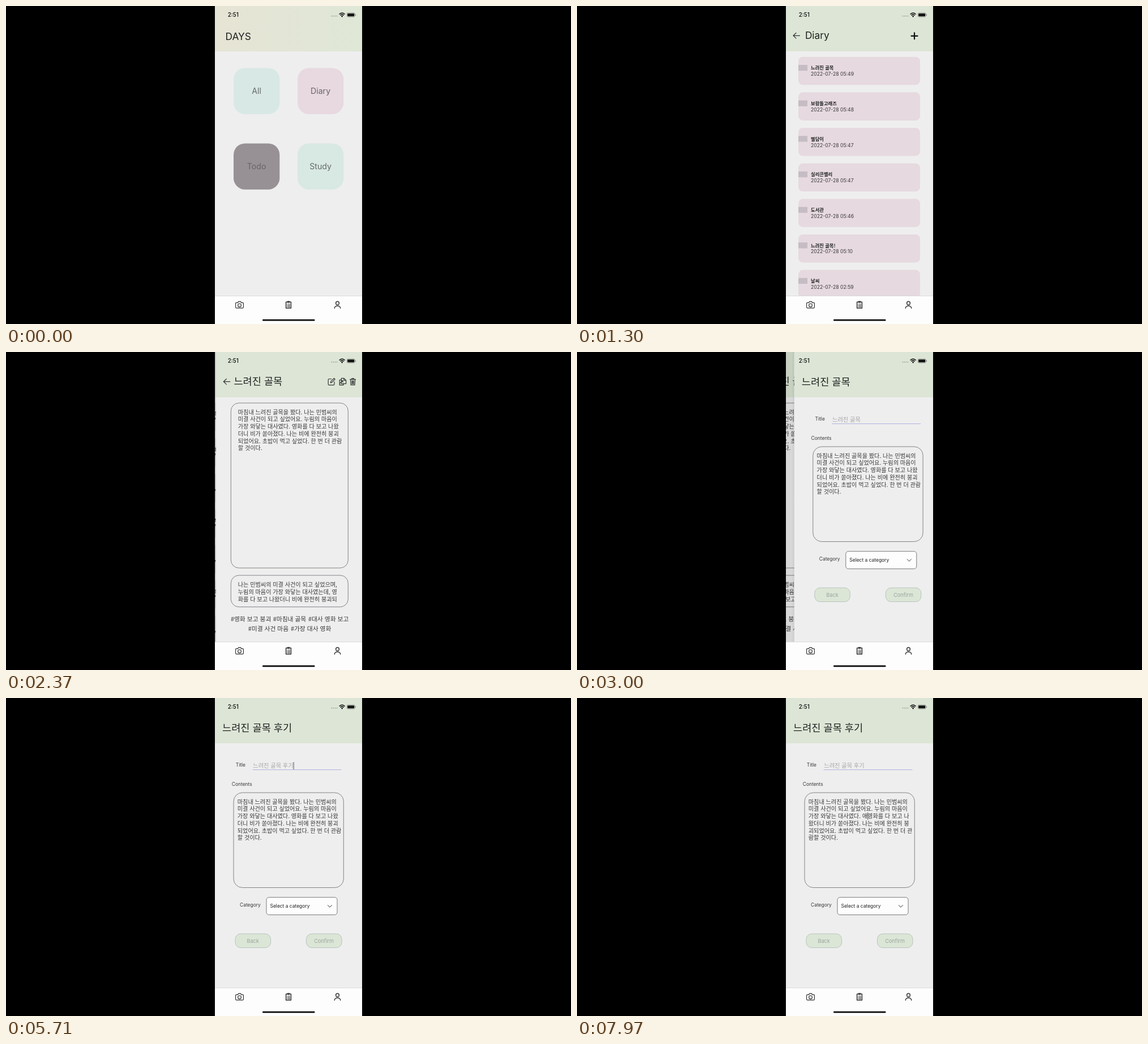
Recreate the animation shown at these times as an HTML page. Size 998 px wide and 561 px high, loop 8 s.

```html
<!DOCTYPE html>
<html lang="ko">
<head>
<meta charset="utf-8">
<title>Diary app</title>
<style>
  html, body { margin: 0; width: 100%; height: 100%; overflow: hidden; background: #000; }
  svg { display: block; width: 100%; height: 100%; }
  text { font-family: Inter, "Noto Sans CJK KR", sans-serif; fill: #1f2020; white-space: pre; }
  .ko { font-family: "Noto Sans CJK KR", "Noto Sans CJK", sans-serif; }
  .mid { text-anchor: middle; }
  .line { fill: none; stroke: #333; stroke-width: 1.2; stroke-linecap: round; stroke-linejoin: round; }
  .box { fill: none; stroke: #77767c; stroke-width: .9; }
</style>
</head>
<body>
<svg id="stage" viewBox="0 0 998 561"></svg>
<script>
const LOOP = 8000, LEFT = 369, WIDTH = 260;
const PITCH = 12.7;
const INK = '#38383a';
const TITLE = '느려진 골목';

const rect = (x, y, w, h, r, fill, more = '') =>
  `<rect x="${x}" y="${y}" width="${w}" height="${h}" rx="${r}" fill="${fill}" ${more}/>`;
const text = (x, y, size, str, more = '') =>
  `<text x="${x}" y="${y}" font-size="${size}" ${more}>${str}</text>`;
const ko = (x, y, size, str, more = '') => text(x, y, size, str, 'class="ko" ' + more);
const line = (d, more = '') => `<path class="line" d="${d}" ${more}/>`;
const box = (x, y, w, h, r) => rect(x, y, w, h, r, 'none', 'class="box"');
const lines = (x, y, rows, id) => rows.map((row, i) =>
  ko(x, y + i * PITCH, 10.12, row, `style="fill:${INK}" ${id ? `id="${id}${i}"` : ''}`)).join('');
const arrow = x => line(`M${x + 11.5} 52.3H${x}m5 -4.8l-5 4.8l5 4.8`);

const story = [
  '마침내 느려진 골목을 봤다. 나는 민범씨의',
  '미결 사건이 되고 싶었어요. 누림의 마음이',
  '가장 와닿는 대사였다. 영화를 다 보고 나왔',
  '더니 비가 쏟아졌다. 나는 비에 완전히 붕괴',
  '되었어요. 초밥이 먹고 싶었다. 한 번 더 관람',
  '할 것이다.'
];
const LEAD = '가장 와닿는 대사였다. ';
const rewrapped = [
  '영화를 다 보고 나',
  '왔더니 비가 쏟아졌다. 나는 비에 완전히 붕',
  '괴되었어요. 초밥이 먹고 싶었다. 한 번 더 관',
  '람할 것이다.'
];

function home() {
  const tile = (x, y, fill, label, ink, id) => `<g id="${id}">` + rect(x, y, 81.3, 81.3, 20, fill) +
    text(x + 40.6, y + 45.7, 14.1, label, `class="mid" style="fill:${ink}"`) + '</g>';
  return rect(LEFT, 0, WIDTH, 80, 0, 'url(#warm)', 'id="tint"') +
    text(387.6, 59.5, 17.3, 'DAYS') +
    tile(402, 109.4, '#d8e8e5', 'All', '#656b6a', 'tileAll') +
    tile(515, 109.4, '#e7d9df', 'Diary', '#6a6467', 'tileDiary') +
    tile(402, 242.4, '#979195', 'Todo', '#6a6468', 'tileTodo') +
    tile(515, 242.4, '#d8e8e3', 'Study', '#656b69', 'tileStudy');
}

function list() {
  const items = [
    [TITLE, '05:49'], ['보람돌고래즈', '05:48'], ['별담이', '05:47'], ['실리콘밸리', '05:47'],
    ['도서관', '05:46'], [TITLE + '!', '05:10'], ['날씨', '02:59']
  ];
  return arrow(382) + text(402.9, 57.7, 17.3, 'Diary') +
    line('M590.5 52.8h11m-5.5 -5.5v11', 'style="stroke:#111;stroke-width:2.2"') +
    items.map(([name, time], i) => `<g id="card${i}" transform="translate(391 ${89.7 + i * 62.65})">` +
      rect(0, 0, 215, 49.6, 8, '#e6d9df') + rect(0, 14.2, 16, 10.3, 0, '#c5bdc3') +
      ko(22, 22.6, 8.3, name, 'font-weight="600"') +
      text(22, 33.5, 8.65, '2022-07-28 ' + time, `style="fill:${INK}"`) + '</g>').join('');
}

function detail() {
  const tags = [
    [395.2, 0, '영화 보고 붕괴'], [470, 0, '마침내 골목'], [532.2, 0, '대사 영화 보고'],
    [426, 1, '미결 사건 마음'], [501.2, 1, '가장 대사 영화']
  ];
  return arrow(382.5) + ko(400.6, 57.7, 17.6, TITLE) +
    `<g id="edit">${line('M573 47.5h-4a1.6 1.6 0 0 0 -1.6 1.6v7.6a1.6 1.6 0 0 0 1.6 1.6h7.6a1.6 1.6 0 0 0 1.6 -1.6v-4M571.5 54.3l.6 -2.4l5.6 -5.4l1.7 1.7l-5.5 5.5z')}</g>` +
    line('M590 49.3h-2.6v9h6.8v-2.2M590.6 46.3h4.6l3.6 3.6v6h-8.2zM595 46.5v3.6h3.6M588 55l5 -4.2m-2.4 -.2h2.6v2.6') +
    line('M605.8 48.4h10M609 48.2v-1.6h3.6v1.6M606.8 48.6l.6 9.6h6.8l.6 -9.6M609.2 50.6v5.6m1.6 -5.6v5.6m1.6 -5.6v5.6') +
    box(395.5, 90, 207, 291, 14) + lines(408, 109.7, story) +
    box(395.5, 394, 207, 55.7, 14) + lines(408, 414.2, [
      '나는 민범씨의 미결 사건이 되고 싶었으며,',
      '누림의 마음이 가장 와닿는 대사였는데, 영',
      '화를 다 보고 나왔더니 비에 완전히 붕괴되'
    ]) +
    tags.map(([x, row, tag]) => ko(x, 475 + row * 17.4, 10.75, '#' + tag, `style="fill:${INK}"`)).join('');
}

function form() {
  const label = (x, y, str) => text(x, y, 8.45, str, `style="fill:${INK}"`);
  const button = (x, str) => rect(x, 416, 62.5, 24.5, 9.5, '#dce6d6', 'stroke="#b3bfbc" stroke-width=".9"') +
    text(x + 31.2, 431.5, 9.2, str, 'class="mid" style="fill:#9ba39f"');
  const caret = id => rect(0, 0, 1.1, 13, 0, '#5c6086', `id="${id}"`);
  return ko(382, 59.2, 17.6, TITLE, 'id="head"') +
    label(405.8, 121, 'Title') + ko(436.3, 122.8, 10.2, TITLE, 'id="input" style="fill:#a6a6aa"') +
    line('M436 126.6H592', 'style="stroke:#b0b0df;stroke-width:1"') + caret('titleCaret') +
    label(398.8, 155, 'Contents') + box(402, 167, 194.3, 167.5, 15.5) +
    lines(408.8, 186.7, story, 'row') + caret('bodyCaret') +
    label(413, 368.4, 'Category') +
    rect(460, 351.7, 125, 30.8, 4.5, '#fdfdfd', 'stroke="#6c6c70" stroke-width=".9"') +
    text(466.5, 370.2, 8.45, 'Select a category') +
    line('M568.3 365.6l3.6 3.5l3.6 -3.5', 'style="stroke-width:1"') +
    button(405, 'Back') + button(530.5, 'Confirm');
}

const chrome = () =>
  text(391.7, 19.3, 9.7, '2:51', 'font-weight="600"') +
  [0, 1, 2, 3].map(i => `<circle cx="${575.5 + i * 3}" cy="17.7" r=".9" fill="#93a48f"/>`).join('') +
  line('M589 14.3q4.6 -4 9.2 0M590.8 16.3q2.8 -2.4 5.6 0', 'style="stroke:#111;stroke-width:1.5"') +
  '<circle cx="593.6" cy="18.3" r="1.2"/>' +
  rect(602.2, 12.2, 14, 7, 2, 'none', 'stroke="#777" stroke-width=".7"') + rect(603.2, 13.2, 12, 5, 1.2, '#111') +
  rect(616.9, 14.5, 1, 2.4, .5, '#777') +
  rect(LEFT, 511.5, WIDTH, 50, 0, '#fdfdfd') + rect(LEFT, 511.2, WIDTH, .8, 0, '#d5d5da') +
  line('M406.8 523.4h2.7l1.2 -2h3.8l1.2 2h2.5a1.2 1.2 0 0 1 1.2 1.2v7a1.2 1.2 0 0 1 -1.2 1.2h-11.4a1.2 1.2 0 0 1 -1.2 -1.2v-7a1.2 1.2 0 0 1 1.2 -1.2z') +
  '<circle class="line" cx="412.5" cy="527.9" r="2.9"/>' +
  line('M494.6 522.2h8.8v10.8h-8.8z', 'style="stroke-width:1.5"') + rect(496.6, 520.6, 4.8, 2.8, .8, '#333') +
  line('M496.8 526h.4m1.4 0h2.8M496.8 528.3h.4m1.4 0h2.8M496.8 530.6h.4m1.4 0h2.8') +
  '<circle class="line" cx="585.5" cy="524.2" r="2.9" style="stroke-width:1.4"/>' +
  line('M580.3 533.2c0 -5.6 10.4 -5.6 10.4 0', 'style="stroke-width:1.4"') +
  rect(453, 552.8, 92.5, 2.7, 1.3, '#0a0a0a');

const page = (body, i) => `<g id="page${i}">` +
  (i ? rect(LEFT - 5, 0, 5, 561, 0, 'url(#edge)') : '') +
  rect(LEFT, 0, WIDTH, 561, 0, '#eeeeee') + rect(LEFT, 0, WIDTH, 80, 0, '#dde6d6') + body +
  rect(LEFT, 0, WIDTH, 561, 0, '#000', `id="shade${i}"`) + '</g>';

document.getElementById('stage').innerHTML = `<defs>
  <clipPath id="phone"><rect x="${LEFT}" y="0" width="${WIDTH}" height="561"/></clipPath>
  <linearGradient id="warm"><stop stop-color="#e6e4d5"/><stop offset="1" stop-color="#dfe7d6"/></linearGradient>
  <linearGradient id="edge"><stop stop-opacity="0"/><stop offset="1" stop-opacity=".06"/></linearGradient>
  </defs>${rect(0, 0, 998, 561, 0, '#000')}<g clip-path="url(#phone)">` +
  [home(), list(), detail(), form()].map(page).join('') + chrome() + '</g>';

const el = {};
document.querySelectorAll('[id]').forEach(node => el[node.id] = node);

const clamp = v => Math.max(0, Math.min(1, v));
const ramp = (t, a, b) => clamp((t - a) / (b - a));

// Critically damped spring used by every page push.
function spring(ms) {
  const x = ms * .033;
  return x <= 0 ? 0 : x > 12 ? 1 : 1 - (1 + x) * Math.exp(-x);
}
const press = (t, down, held, up) => 1 - .8 * (ramp(t, down, held) - ramp(t, up, up + 150));
// Last value whose time has come.
const pick = (t, steps, first) => steps.reduce((v, [at, next]) => t >= at ? next : v, first);
const write = (node, str) => { if (node.textContent !== str) node.textContent = str; };

const pushes = [-1e4, 913.5, 2157, 2862];
const titleKeys = [[5050, ' '], [5190, ' ㅎ'], [5330, ' 후'], [5500, ' 훅'], [5650, ' 후기']];
const bodyKeys = [[7810, 'ㅇ'], [7870, '아'], [7940, '애']];

function caret(node, x, y, alpha) {
  node.setAttribute('x', x);
  node.setAttribute('y', y);
  node.setAttribute('opacity', alpha);
}

function render(t) {
  const p = pushes.map(at => spring(t - at));
  p.forEach((v, i) => {
    const next = p[i + 1] || 0, g = el['page' + i];
    g.setAttribute('transform', `translate(${WIDTH * (1 - v) - WIDTH * .3 * next} 0)`);
    g.setAttribute('visibility', v > 0 && next < 1 ? 'visible' : 'hidden');
    el['shade' + i].setAttribute('opacity', .1 * next);
  });

  el.tint.setAttribute('opacity', 1 - ramp(t, 30, 170));
  el.tileDiary.setAttribute('opacity', press(t, 890, 920, 960));
  el.card0.setAttribute('opacity', press(t, 1990, 2080, 2190));
  el.edit.setAttribute('opacity', press(t, 2830, 2860, 2900));

  const name = TITLE + pick(t, titleKeys, '');
  write(el.head, name);
  write(el.input, name);
  const typed = pick(t, bodyKeys, '');
  const tail = typed ? [LEAD + typed + rewrapped[0], ...rewrapped.slice(1)] : story.slice(2);
  tail.forEach((row, i) => write(el['row' + (i + 2)], row));

  caret(el.titleCaret, 436.3 + el.input.getComputedTextLength(), 113,
    t >= 4000 && t < 5910 ? 1 : 0);
  caret(el.bodyCaret, 408.8 + el.row2.getSubStringLength(0, LEAD.length + typed.length), 201.8,
    ramp(t, 7240, 7400));
}

function tick() {
  render(performance.now() % LOOP);
  requestAnimationFrame(tick);
}
tick();
</script>
</body>
</html>
```
